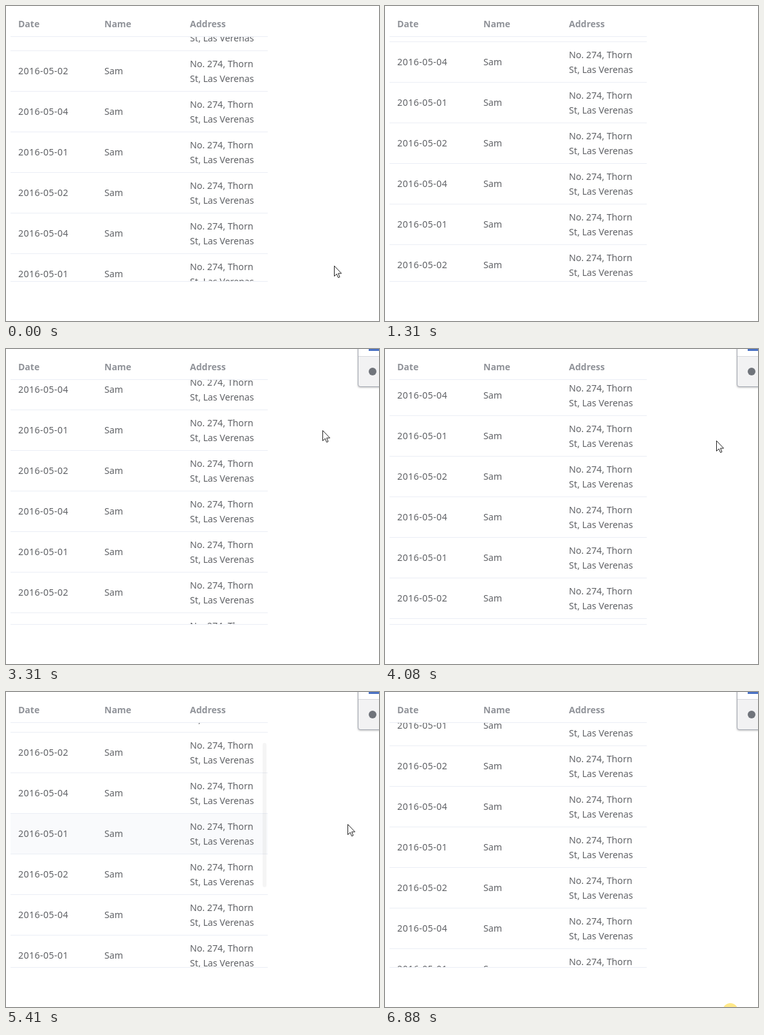
An HTML page that plays this animation: 580 by 489 pixels, repeating every 6.95 s.

```html
<!DOCTYPE html>
<html lang="en">
<head>
<meta charset="utf-8">
<title>Auto-scrolling table</title>
<style>
  html, body { margin: 0; width: 100%; height: 100%; overflow: hidden; background: #fff; }
  body { position: relative; font: 14.2px/23px "Noto Sans", "Open Sans", sans-serif; color: #606266; }
  div, svg { position: absolute; box-sizing: border-box; white-space: nowrap; }
  .head { left: 7px; top: 0; width: 400px; height: 48px; border-bottom: 1px solid #ebeef5;
          font-size: 14px; font-weight: 700; color: #909399; }
  .head div { top: 16px; }
  .view { left: 7px; top: 48px; width: 400px; height: 380px; overflow: hidden; }
  .view::after { content: ""; position: absolute; left: 0; bottom: 0; width: 100%; height: 1px; background: #ebeef5; }
  .list { left: 0; top: 0; width: 100%; }
  .row { left: 0; width: 100%; height: 63px; border-bottom: 1px solid #ebeef5; }
  .date, .name { top: 19px; }
  .date { letter-spacing: .4px; }
  .date, .head .c0 { left: 12px; }
  .name, .head .c1 { left: 146px; }
  .addr, .head .c2 { left: 279px; }
  .addr { top: 8px; }
  .thumb { left: 392px; top: 2px; width: 6px; height: 224px; border-radius: 4px; background: rgba(144, 147, 153, .3); }
  .panel { left: 547px; top: -10px; width: 60px; height: 69px; border: 1px solid #a4a8b2; border-radius: 4px;
           background: #f2f2f3; box-shadow: 0 1px 3px rgba(0, 0, 0, .25); overflow: hidden; }
  .tab { left: 0; top: 0; width: 100%; height: 21px; background: #fff; border-bottom: 1px solid #d6d8dc; }
  .mark { left: 16px; top: 9px; width: 40px; height: 3px; background: #4a72c4; }
  .dot { left: 16px; top: 38px; width: 12px; height: 12px; border-radius: 50%; background: #70747b; }
  .click { left: 525px; top: 483px; width: 24px; height: 24px; border-radius: 50%; background: #ffe98a; }
  .pointer { left: 0; top: 0; overflow: visible; }
</style>
</head>
<body>
<div class="head"><div class="c0">Date</div><div class="c1">Name</div><div class="c2">Address</div></div>
<div class="view"><div class="list"></div><div class="thumb"></div></div>
<div class="panel"><div class="tab"></div><div class="mark"></div><div class="dot"></div></div>
<div class="click"></div>
<svg class="pointer" width="14" height="21">
  <path d="M.5 .5V16.5L4.2 13L6.6 18.7L9 17.7L6.6 12.1H11.6Z" fill="#fff" stroke="#222" stroke-width="1"/>
</svg>
<script>
const LOOP = 6950, ROW = 63, ROWS = 10, VIEW_TOP = 48, VIEW = 380;
const PAUSE = 1310, RESUME = 1510, STEP = 70;
const MAX_SCROLL = ROWS * ROW - VIEW;

// Keys: [time, values...]; scroll is unwrapped distance
const scrollKeys = [[0, 230], [PAUSE, 618], [RESUME - STEP, 618], [2330, 834],
  [3310, 1142], [5410, 1798], [6880, 2216]];
const pointerKeys = [[140, 510, 403], [1580, 486, 60], [2330, 486, 72], [3310, 492, 126],
  [4640, 532, 153], [5340, 396, 200], [5410, 531, 205], [6740, 548, 395]];

function at(keys, t) {
  const i = keys.findIndex(k => k[0] > t);
  if (i === 0) return keys[0].slice(1);
  if (i < 0) return keys[keys.length - 1].slice(1);
  const a = keys[i - 1], b = keys[i], u = (t - a[0]) / (b[0] - a[0]);
  return a.slice(1).map((v, j) => v + (b[j + 1] - v) * u);
}

// The picture advances in even steps and rests from PAUSE to RESUME
function quantize(t) {
  if (t < RESUME) {
    const step = PAUSE / 19;
    return Math.min(PAUSE, Math.floor(t / step + 1e-6) * step);
  }
  return Math.floor((t - 20) / STEP) * STEP + 20;
}

const clamp = v => Math.max(0, Math.min(1, v));
const find = s => document.querySelector(s);
const show = (el, on) => { el.style.visibility = on ? "visible" : "hidden"; };
const move = (el, x, y) => { el.style.transform = `translate(${x}px, ${y}px)`; };

const list = find(".list"), thumb = find(".thumb"), panel = find(".panel"),
  click = find(".click"), pointer = find(".pointer");

const rows = Array.from({ length: ROWS }, (_, i) => {
  const day = i ? ["01", "02", "04"][i % 3] : "03";
  const row = document.createElement("div");
  row.className = "row";
  row.style.top = i * ROW + "px";
  row.innerHTML = `<div class="date">2016-05-${day}</div><div class="name">Sam</div>` +
    `<div class="addr">No. 274, Thorn<br>St, Las Verenas</div>`;
  list.append(row);
  return row;
});

function draw(t) {
  const scroll = Math.round(at(scrollKeys, t)[0]) % MAX_SCROLL;
  const [x, y] = at(pointerKeys, t).map(Math.round);
  const hover = clamp(Math.min((t - 5130) / 140, (5550 - t) / 250));
  const hovered = Math.floor((y - VIEW_TOP + scroll) / ROW);

  move(list, 0, -scroll);
  move(thumb, 0, Math.round(scroll * (VIEW - 4) / (ROWS * ROW)));
  thumb.style.opacity = hover * hover;
  rows.forEach((row, i) => {
    row.style.background = i === hovered ? `rgba(245, 247, 250, ${hover})` : "";
  });
  move(pointer, x, y);
  show(pointer, t < 130 || t >= 1580 && t < 6810);
  show(panel, t > PAUSE);
  show(click, t >= 6810);
}

const start = performance.now();
let last = -1;
function frame() {
  const tick = quantize((performance.now() - start) % LOOP);
  if (tick !== last) draw(last = tick);
  requestAnimationFrame(frame);
}
frame();
</script>
</body>
</html>
```
